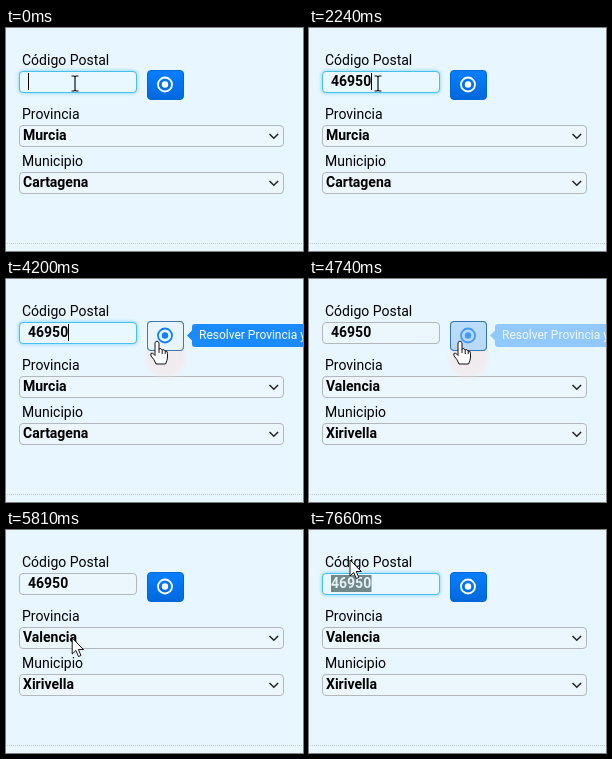
Write an HTML page that moves like this. It is 297 px wide and 223 px high and loops after 8 s.

```html
<!DOCTYPE html>
<html lang="es">
<head>
<meta charset="utf-8">
<style>
html, body { margin: 0; width: 100%; height: 100%; overflow: hidden; background: #e8f6ff; }
svg { display: block; width: 297px; height: 223px; font: 14px Roboto, sans-serif; }
text { white-space: pre; }
.value { font-weight: 700; }
.box { fill: #ebf6fd; stroke: #b2b8bc; }
.chevron { fill: none; stroke: #222; stroke-width: 1.5; }
#glow { fill: none; stroke: #4cc6f7; stroke-width: 3; filter: blur(1.5px); }
#ring { fill: #e9f7ff; stroke: #49bff0; }
.pointer { fill: #fff; stroke: #111; stroke-linejoin: round; }
</style>
</head>
<body>
<svg viewBox="0 0 297 223">
  <defs>
    <linearGradient id="blue" x2="0" y2="1"><stop stop-color="#087fff"/><stop offset="1" stop-color="#0068dc"/></linearGradient>
    <radialGradient id="warm"><stop offset=".7" stop-color="#fbdfda"/><stop offset="1" stop-color="#fbe4e0" stop-opacity="0"/></radialGradient>
  </defs>
  <path d="M0 215.500H297" stroke="#c3cfd6" stroke-dasharray="1 1" stroke-dashoffset="1"/>

  <text x="16" y="37">Código Postal</text>
  <text x="16" y="91">Provincia</text>
  <text x="16" y="138">Municipio</text>

  <rect id="glow" x="13.500" y="43.500" width="117" height="21" rx="4"/>
  <rect class="box" x="13.500" y="43.500" width="117" height="21" rx="3.500"/>
  <rect id="ring" x="13.500" y="43.500" width="117" height="21" rx="3.500"/>
  <rect id="selection" x="22" y="45" width="40.500" height="17" fill="#71878a"/>
  <text id="code" class="value" x="22" y="58"></text>
  <rect id="caret" y="45" width="1" height="17"/>

  <rect class="box" x="13.500" y="97.500" width="264" height="21" rx="3.500"/>
  <rect class="box" x="13.500" y="144.500" width="264" height="21" rx="3.500"/>
  <text id="province" class="value" x="17" y="112"></text>
  <text id="town" class="value" x="17" y="159"></text>
  <path class="chevron" d="M263.500 106l4.300 4.300 4.300-4.300M263.500 153l4.300 4.300 4.300-4.300"/>

  <circle id="warmth" cx="159.500" cy="79" r="23" fill="url(#warm)"/>
  <rect x="141.500" y="42.500" width="36" height="29" rx="3.500" fill="url(#blue)" stroke="#0068d6"/>
  <rect id="hover" x="141.500" y="42.500" width="36" height="29" rx="3.500" fill="#e8f5ff" stroke="#4477ad"/>
  <g id="icon">
    <circle cx="159" cy="56.500" r="7" fill="none" stroke="currentColor" stroke-width="1.800"/>
    <circle cx="159" cy="56.500" r="3.200" fill="currentColor"/>
  </g>
  <g id="tip" fill="#1a8bff">
    <path d="M181 56.500l5-5v10z"/>
    <rect x="186" y="45" width="190" height="23" rx="3"/>
    <text x="193" y="60" font-size="12" fill="#fff">Resolver Provincia y Municipio</text>
  </g>

  <path id="beam" d="M-3.500-7.500h2.500l1 1 1-1h2.500M0-6.500V6.500M-3.500 7.500h2.500l1-1 1 1h2.500" fill="none" stroke="#111" stroke-width="1.200"/>
  <path id="arrow" class="pointer" d="M0 0V16L3.700 12.500 6.300 18.500 8.800 17.500 6.200 11.500H11.300Z"/>
  <g id="hand" class="pointer">
    <path d="M-2 1.500Q0-1.500 2 1.500V8Q4 6.500 5.200 9Q7.200 7.700 8.200 10Q10.500 9.500 10.500 12.500V16Q10.500 19 8.500 23H-1Q-2.500 18.500-6 15Q-7 11.500-4.500 12L-2 14.500Z"/>
    <path d="M2 8v4M5.200 9v4M8.200 10v3" fill="none"/>
  </g>
</svg>
<script>
const LOOP = 8000, STEP = 135, BLINK = 522;
const TYPE = 1290, KEY_GAP = 237, LAST_KEY = 2110;
const HOVER = 3180, CLICK = 4470, REFOCUS = 6805;
const $ = id => document.getElementById(id);

const start = [69, 55.5];
const moves = [
  { at: 2910, time: 675, via: [148, -8], to: [151, 62], power: 2.4 },
  { at: 4740, time: 640, via: [115, 95], to: [74, 109], power: 1 },
  { at: 5675, time: 835, via: [45, 110], to: [76, 61], power: 1 },
  { at: 7525, time: STEP, via: [60, 45], to: [41, 30], power: 1 },
];

// Progress from 0 to 1, advancing in steps like a screen recording.
function ramp(t, at, time) {
  const elapsed = Math.floor((t - at) / STEP) * STEP;
  return Math.min(1, Math.max(0, elapsed / time));
}

function cursorAt(t) {
  let from = start;
  for (const { at, time, via, to, power } of moves) {
    const u = 1 - (1 - ramp(t, at, time)) ** power, v = 1 - u;
    const point = from.map((p, i) => v * v * p + 2 * u * v * via[i] + u * u * to[i]);
    if (u < 1) return point;
    from = to;
  }
  return from;
}

function cursorKind([x, y]) {
  if (x < 131 && y > 43 && y < 66) return 'beam';
  return x > 141 && y > 42 && y < 72 ? 'hand' : 'arrow';
}

function caretVisible(t) {
  if (t >= CLICK && t < REFOCUS + STEP) return false;
  if (t >= CLICK) return true;
  const sinceActive = t < TYPE ? t + 60 : Math.max(0, t - LAST_KEY);
  return Math.floor(sinceActive / BLINK) % 2 === 0;
}

const fade = (id, amount) => $(id).setAttribute('opacity', +amount);
const mix = (a, b, k) => `rgb(${a.map((v, i) => v + (b[i] - v) * k)})`;

function draw(t) {
  const typed = Math.min(5, Math.max(0, 1 + Math.floor((t - TYPE) / KEY_GAP)));
  const resolved = t >= CLICK + STEP;
  const selected = t >= REFOCUS + 3 * STEP;
  const hover = ramp(t, HOVER, 2 * STEP) - ramp(t, CLICK + STEP, 5 * STEP);
  const tip = ramp(t, HOVER, 2 * STEP) - ramp(t, CLICK, 4 * STEP);
  const focus = 1 - ramp(t, CLICK, 2 * STEP) + ramp(t, REFOCUS, 3 * STEP);

  $('code').textContent = '46950'.slice(0, typed);
  $('code').setAttribute('fill', selected ? '#e6f1f3' : '#000');
  $('caret').setAttribute('x', 22 + 8 * typed);
  $('province').textContent = resolved ? 'Valencia' : 'Murcia';
  $('town').textContent = resolved ? 'Xirivella' : 'Cartagena';

  fade('caret', caretVisible(t) && !selected);
  fade('selection', selected);
  fade('glow', focus * .5);
  fade('ring', focus);
  fade('hover', hover);
  fade('tip', tip * (2 + tip) / 3);
  fade('warmth', Math.min(.45, hover));
  $('icon').style.color = mix([255, 255, 255], [16, 128, 255], hover);

  const point = cursorAt(t), kind = cursorKind(point);
  for (const id of ['beam', 'arrow', 'hand']) fade(id, id === kind);
  $(kind).setAttribute('transform', `translate(${point})`);
}

function loop() {
  draw(performance.now() % LOOP);
  requestAnimationFrame(loop);
}
loop();
</script>
</body>
</html>
```
